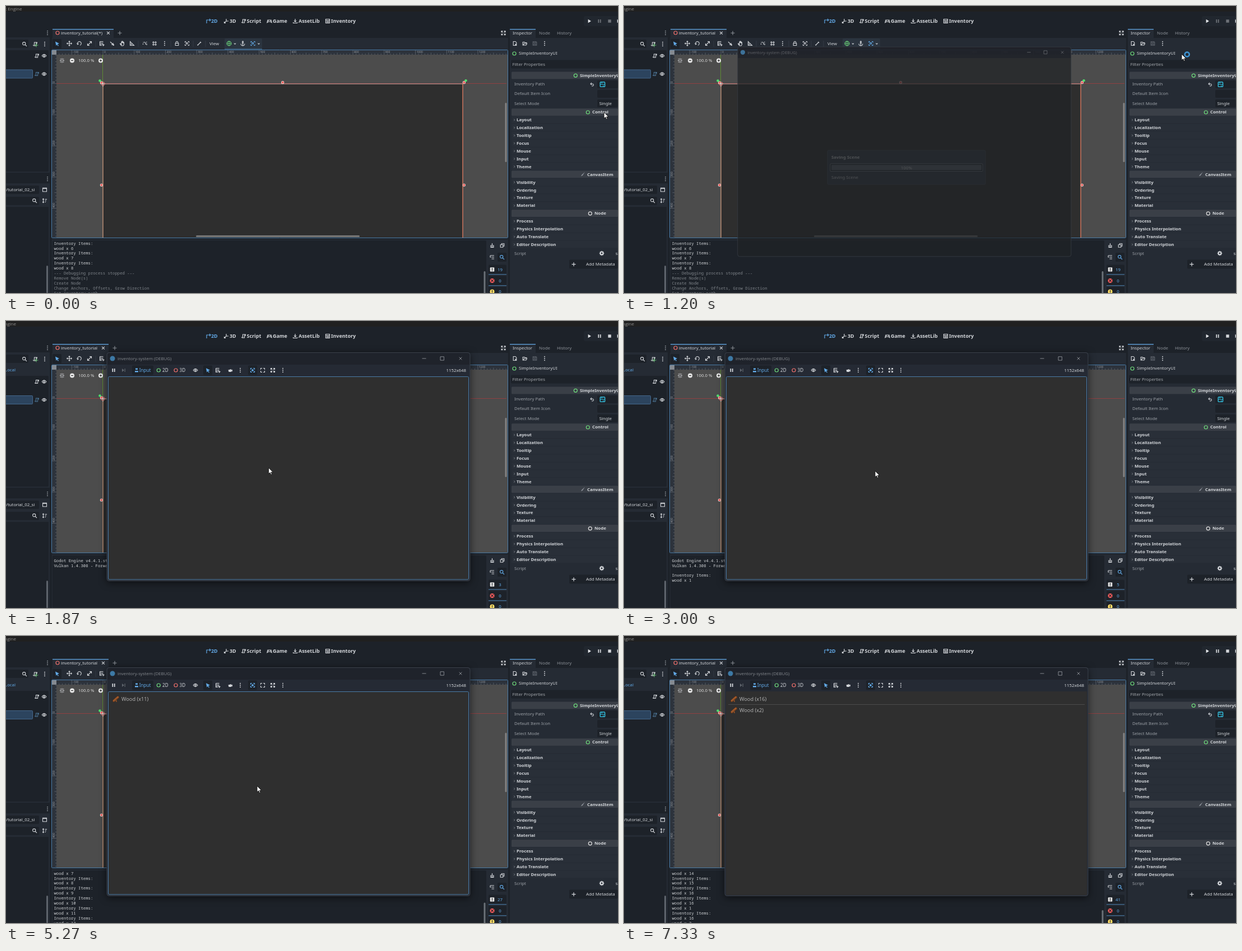
An HTML page with a canvas for the animation above (7800 ms loop, 1092 px wide and 513 px high).

```html
<!DOCTYPE html>
<html lang="en">
<head>
<meta charset="utf-8">
<title>Inventory editor</title>
<style>
html, body { margin: 0; width: 100%; height: 100%; overflow: hidden; background: #1d2229; }
canvas { display: block; width: 1092px; height: 513px; }
</style>
</head>
<body>
<canvas id="stage" width="1092" height="513"></canvas>
<script>
const c = document.getElementById('stage').getContext('2d');
const LOOP = 7800, FPS = 15;
const SANS = '"Noto Sans", sans-serif';
const GAME = '"Open Sans", sans-serif';
const MONO = '"Noto Sans Mono", monospace';
const BG = '#1d2229', PANEL = '#252b34', FG = '#d3d6da', DIM = '#8d9299', BLUE = '#62a9e6', EDGE = '#4a7ca8';
const GREEN = '#6fdc7c', RED = '#f0706c', BAR = '#3a3f47', MUTED = '#5d636b';

// Icon outlines, centred on the origin
const ICON = {
  select: 'M-3-4L4-.5L1 .7L3 3.5L1.8 4.3L0 1.5L-1.6 3.4Z',
  move: 'M0-4V4M-4 0H4M-1.3-3L0-4.3L1.3-3M-1.3 3L0 4.3L1.3 3M-3-1.3L-4.3 0L-3 1.3M3-1.3L4.3 0L3 1.3',
  rotate: 'M-3.2 1.5A3.4 3.4 0 1 1 1 3.2M-4.4-.5L-3.2 1.8L-1.2 .3',
  scale: 'M-3 3L3-3M0-3.5H3.5V0M-3.5 0V3.5H0',
  list: 'M-3.5-3.5H2.5M-3.5-1H2.5M-3.5 1.5H0M-3.5-3.5V3.5H0M1 1L4 2.5L2.5 4Z',
  pivot: 'M-3-3L2 2M2-1V2H-1M3 1V4M1.5 3H4',
  hand: 'M-3 0L-1 2V-3H0V-1V-4H1V-1V-3H2.3V0V-2H3.4V2L2 4H-1L-3.5 .5Z',
  ruler: 'M-3.5-3.5V3.5H3.5ZM-1.8 .2V1.8H0',
  magnet: 'M-3.5-2H-1.5M-3.5 2V0M1-2V2M3 0V3M-.5-3V-1.5M3.5-2.5H2',
  grid: 'M-2-4V4M2-4V4M-4-2H4M-4 2H4',
  lock: 'M-2.8-.5H2.8V3.5H-2.8ZM-1.8-.5V-2A1.8 1.8 0 0 1 1.8-2V-.5',
  group: 'M-3.5-1.5V-3.5H-1.5M1.5-3.5H3.5V-1.5M3.5 1.5V3.5H1.5M-1.5 3.5H-3.5V1.5M-1.5-1.5H1V1H-1.5Z',
  bone: 'M-2.5 2.5L2-2M-3.6 2.2L-2.2 3.6M1.4-3.2L3.2-1.4',
  anchor: 'M0-2.2V4M-3.5 .5Q-3 4 0 4Q3 4 3.5 .5M-1.8-.8H1.8M0-4.1A1 1 0 1 1 0-2.1A1 1 0 1 1 0-4.1',
  chev: 'M-1.6-.8L0 .8L1.6-.8',
  right: 'M-.8-1.6L.8 0L-.8 1.6',
  search: 'M1.4 1.4L4 4M1.8-.8A2.6 2.6 0 1 1-3.4-.8A2.6 2.6 0 1 1 1.8-.8',
  script: 'M-3 3H1.5L2-3H-1.5V2.5M-1.5-3H3.3V-1.2H2M-3.3 1.5V3',
  eye: 'M-4 0Q0-5.2 4 0Q0 5.2-4 0M1.2 0A1.2 1.2 0 1 1-1.2 0A1.2 1.2 0 1 1 1.2 0',
  expand: 'M-3.5-1V-3.5H-1M1-3.5H3.5V-1M3.5 1V3.5H1M-1 3.5H-3.5V1M-3-3L-1-1M3-3L1-1M-3 3L-1 1M3 3L1 1',
  frame: 'M-3.5-1V-3.5H-1M1-3.5H3.5V-1M3.5 1V3.5H1M-1 3.5H-3.5V1',
  cross: 'M-2.4-2.4L2.4 2.4M2.4-2.4L-2.4 2.4',
  plus: 'M-3.5 0H3.5M0-3.5V3.5',
  win: 'M-3.5-3.2H3.5V3.2H-3.5ZM-3.5-2.2H3.5',
  sort: 'M-2.5-3.5V3.5M-3.8-2.2L-2.5-3.6L-1.2-2.2M-3.8 2.2L-2.5 3.6L-1.2 2.2M.5-2.5H4M.5 0H3M.5 2.5H2',
  doc: 'M-2.8-3.5H1L2.8-1.5V3.5H-2.8ZM0 2H3M1.4 .5V3.5',
  folder: 'M-3.8-2.5H-1L0-1.5H3V0H-1.5L-3 3H-3.8ZM-3 3H2L3.8 0',
  save: 'M-3.3-3.3H2.2L3.3-2.2V3.3H-3.3ZM-1.5-3V-1H1.5V-3M-1.5 3V1H1.5V3',
  undo: 'M-2.5-.8H1A2 2 0 0 1 1 3H-1M-1-2.8L-3-.8L-1 1.2',
  broom: 'M0-4V-.5M-2.5 0H2.5V3.5H-2.5ZM-.8 1.5V3.5M.8 1.5V3.5',
  copy: 'M-3.3-1.3H1.3V3.3H-3.3ZM-1.3-1.3V-3.3H3.3V1.3H1.3',
  tree: 'M-3.5-3H3.5M-1-0H3.5M-1 3H3.5M-3.5-3V0H-2',
  d2: 'M-3 4V-2H4M2-4L4-2L2 0',
  d3: 'M-3.5 3.5L0 0V-4M0 0H4M-3.5 1V3.5H-1',
  game: 'M-4 2.5L-3-2H3L4 2.5L1.5 1H-1.5ZM-1-.5H-2.5M1-.5H2.5',
  down: 'M0-4V1M-2-1L0 1.5L2-1M-3.5 2V3.5H3.5V2',
  items: 'M-3.5-3.5H3.5V3.5H-3.5ZM-3.5-1H3.5M-1-1V3.5M1.2-1V3.5',
  brush: 'M-3.5 3.5L-2 1L3.5-4L-.5 2.2Z',
  joy: 'M-3 3.5V1H3V3.5ZM0 1V-1M-2-3.5H2V-1H-2Z',
  cam: 'M-3.5-.5L2-2V3H-2.5ZM2 0L4-1.5V2.5L2 1.5M-2-3H0',
  center: 'M-4 0H-1M1 0H4M0-4V-1M0 1V4M-3-3L-2-2M3 3L2 2M3-3L2-2M-3 3L-2 2',
  play: 'M-2.4-3.2L3 0L-2.4 3.2Z',
  pause: 'M-2.6-3H-.8V3H-2.6ZM.8-3H2.6V3H.8Z',
  stop: 'M-2.7-2.7H2.7V2.7H-2.7Z',
  next: 'M-3-3L1 0L-3 3ZM1.6-3H2.8V3H1.6Z'
};
for (const k in ICON) ICON[k] = new Path2D(ICON[k]);
const ARROW = new Path2D('M0 0V11L2.6 8.6L4.3 12.4L6.1 11.6L4.4 8H8Z');

function rect(x, y, w, h, col, r = 0) {
  c.fillStyle = col;
  c.beginPath(); c.roundRect(x, y, w, h, r); c.fill();
}
function box(x, y, w, h, col, r = 0, lw = 1) {
  c.strokeStyle = col; c.lineWidth = lw;
  c.beginPath(); c.roundRect(x, y, w, h, r); c.stroke();
}
function line(x1, y1, x2, y2, col, lw = 1) {
  c.strokeStyle = col; c.lineWidth = lw;
  c.beginPath(); c.moveTo(x1, y1); c.lineTo(x2, y2); c.stroke();
}
function disc(x, y, r, col) {
  c.fillStyle = col;
  c.beginPath(); c.arc(x, y, r, 0, 7); c.fill();
}
function ring(x, y, r, col, lw = 1.2) {
  c.strokeStyle = col; c.lineWidth = lw;
  c.beginPath(); c.arc(x, y, r, 0, 7); c.stroke();
}
// y is the middle of the capitals
function text(s, x, y, col = FG, size = 7.82, o = {}) {
  c.font = (o.bold ? '700 ' : '') + size + 'px ' + (o.font || SANS);
  c.textAlign = o.align || 'left';
  c.fillStyle = col;
  c.fillText(s, x, y + size * .357);
}
function icon(name, x, y, col = FG, lw = 1.1, fill = false) {
  c.save();
  c.translate(x, y);
  c.fillStyle = c.strokeStyle = col; c.lineWidth = lw;
  fill ? c.fill(ICON[name]) : c.stroke(ICON[name]);
  c.restore();
}
const solid = (name, x, y, col) => icon(name, x, y, col, 1, true);
function dots(x, y, col = FG) {
  for (let i = -1; i < 2; i++) disc(x, y + i * 3.2, .95, col);
}

function topBar(f) {
  rect(0, 0, 1092, 10, '#202020');
  text('Godot Engine', f < 14 ? 28.5 : 18, 5, '#8f8f8f', 8, { align: 'right', font: GAME });
  const tabs = [['d2', 361, '2D', 366], ['d3', 393, '3D', 399], ['script', 424, 'Script', 429.5],
    ['game', 470, 'Game', 476], ['down', 516, 'AssetLib', 522], ['items', 574, 'Inventory', 580]];
  tabs.forEach(([n, ix, s, x], i) => {
    const col = i ? FG : BLUE;
    icon(n, ix, 27, col, 1.2);
    text(s, x, 27, col, 8.93, { bold: true });
  });
  const on = f >= 20 ? FG : '#6d7278';
  rect(1031, 18, 61, 18, '#21272f', 3);
  solid('play', 1041, 27, '#e4e6e9');
  solid('pause', 1059, 27, on);
  solid('stop', 1077, 27, on);
  solid('play', 1093, 27, FG);
}

function leftDock(f) {
  const run = f >= 20;
  rect(0, 56, 78, 242, PANEL);
  dots(74, 48, DIM);
  rect(0, 60, 40, 15, BG, 2);
  icon('search', 33, 68);
  icon('script', 52, 68);
  icon('plus', 54, 70, GREEN, .8);
  dots(69, 68);
  rect(0, run ? 98 : 79, 76, run ? 198 : 217, BG, 2);
  if (run) text('Local', 17, 87.5, BLUE, 7.82, { align: 'right' });
  const y1 = run ? 108.5 : 89, y2 = run ? 141 : 121.5;
  rect(-3, y2 - 7.5, 50.5, 15, '#2c445e', 1);
  box(-3, y2 - 7.5, 50.5, 15, '#44678b', 1);
  icon('script', 55, y1);
  icon('eye', 68, y1);
  icon('script', 55, y2, '#4d7596');
  icon('eye', 68, y2);

  rect(0, 317, 78, 196, PANEL);
  dots(74, 309, DIM);
  rect(0, 321, 59, 15, BG, 2);
  text('/tutorial_02_si', 0, 328, FG);
  icon('win', 69, 328.5);
  rect(0, 341, 59, 15, BG, 2);
  icon('search', 51, 348);
  icon('sort', 69, 348);
  rect(0, 359, 76, 154, BG);
  rect(72, 464, 3, 49, '#5e646c', 1.5);
}

function toolbar(f) {
  const dirty = f < 14, end = dirty ? 192 : 183;
  rect(83, 41, end - 83, 16, PANEL);
  rect(83, 41, end - 83, 1.2, BLUE);
  ring(92, 48, 3, RED);
  text('inventory_tutorial' + (dirty ? '(*)' : ''), 98, 48.3, FG);
  icon('cross', end - 9.5, 48.3);
  icon('plus', end + 11, 48.3, DIM);
  icon('expand', 887.5, 48.3);
  rect(82, 57, 814, 21, PANEL);
  rect(83, 59, 16, 17, BG, 2);
  solid('select', 91, 67.5, BLUE);
  'move113 rotate131 scale149 list171 pivot189 hand207 ruler225 magnet248 grid265 lock305 group323 bone345'
    .split(' ').forEach(s => icon(s.match(/\D+/)[0], +s.match(/\d+/)[0], 67));
  dots(283, 67);
  for (const x of [160, 236, 294, 334, 356]) line(x, 62, x, 73, '#343b45');
  text('View', 363, 67.3);
  rect(390, 58, 67, 19, '#2b343f', 2);
  rect(390, 76.5, 67, 1, EDGE);
  ring(398, 67, 3.8, GREEN);
  icon('plus', 398, 67, GREEN, .9);
  icon('chev', 408.5, 67.5);
  icon('anchor', 422.5, 67);
  icon('group', 440.5, 67, BLUE);
  icon('chev', 451, 67.5);
}

function ruler() {
  const S = 55.75, dark = '#2d333c', tick = '#747a82';
  rect(82, 79, 813, 8, dark);
  rect(82, 79, 8, 335, dark);
  c.save();
  c.beginPath(); c.rect(90, 79, 805, 8); c.clip();
  for (let k = -20; k < 130; k++) {
    const x = 173 + k * S / 10;
    line(x, k % 10 ? (k % 5 ? 85 : 83.5) : 79, x, 87, tick, .6);
    if (k % 10 === 0) text(k * 10, x + 2, 82.5, '#9a9fa6', 5);
  }
  c.restore();
  c.save();
  c.beginPath(); c.rect(82, 87, 8, 327); c.clip();
  for (let k = -10; k < 50; k++) {
    const y = 138.5 + k * S / 10;
    line(k % 10 ? (k % 5 ? 88 : 86.5) : 82, y, 90, y, tick, .6);
    if (k % 10 === 0) {
      c.save();
      c.translate(85.5, y - 1); c.rotate(-Math.PI / 2);
      text(k * 10, 0, 0, '#9a9fa6', 5);
      c.restore();
    }
  }
  c.restore();
  rect(82, 79, 8, 8, '#858a91');
}

function handle(x, y) {
  disc(x, y, 2.6, '#fff');
  disc(x, y, 2.1, '#e8605c');
}

function viewport() {
  rect(82, 79, 813, 335, '#4c4c4c');
  rect(173, 139, 642, 275, '#2e2e2e');
  line(90, 138.5, 893, 138.5, '#8f3f42');
  line(172.5, 87, 172.5, 139, '#5d8b33');
  line(173, 139.2, 815, 139.2, '#c3a59b', 1.1);
  line(173, 139, 173, 414, '#e2a887', 1.1);
  line(815, 139, 815, 414, '#e27c62', 1.3);
  disc(167.5, 133.5, 2.3, '#4fe06c');
  disc(820.5, 133.3, 2.3, '#4fe06c');
  handle(170.5, 137);
  line(168.5, 139, 177, 139, '#ddd', 1);
  line(173, 135.5, 173, 144, '#ddd', 1);
  box(170.5, 136.5, 5, 5, RED, 0, .8);
  handle(493.7, 136.7);
  handle(817.3, 136.7);
  handle(170.4, 320);
  handle(817.3, 320);
  icon('center', 100, 97.5);
  disc(118, 97.5, 4, '#e8e8e8');
  line(116, 97.5, 120, 97.5, '#333', 1.2);
  text('100.0 %', 129, 97.7, '#d8d8d8');
  disc(169, 97.5, 4, '#e8e8e8');
  line(167, 97.5, 171, 97.5, '#333', 1.2);
  line(169, 95.5, 169, 99.5, '#333', 1.2);
  rect(890.5, 173, 3, 106, '#838383', 1.5);
  rect(339, 410, 292, 3, '#7b7b7b', 1.5);
  ruler();
  box(81.5, 78.5, 814, 336, EDGE, 1);
}

const OUT = [45, 51, 55, 58, 61, 65, 68, 70, 72, 74, 77, 79, 82, 84, 87, 89];
const LATE = { 45: 46, 74: 75, 79: 80 };
function stock(f) {
  return {
    logged: OUT.filter(t => f >= t).length,
    shown: OUT.filter(t => f >= (LATE[t] || t)).length,
    spill: (f >= 91) + (f >= 94)
  };
}

function output(f, st) {
  const HEAD = 'Inventory Items:', log = [];
  let badge = 0, gray = Infinity, bar = 0;
  if (f < 19) {
    for (let i = 6; i < 9; i++) log.push(HEAD, 'wood x ' + i);
    log.push('--- Debugging process stopped ---', 'Remove Node(s)', 'Create Node',
      'Change Anchors, Offsets, Grow Direction', 'Set inventory path');
    badge = 19; gray = 6; bar = 474;
  } else if (f >= 27) {
    log.push('Godot Engine v4.4.1.stable', 'Vulkan 1.4.308 - Forward+', '');
    for (let i = 1; i <= st.logged; i++) log.push(HEAD, 'wood x ' + i);
    for (let i = 1; i <= st.spill; i++) log.push(HEAD, 'wood x 16', 'wood x ' + i);
    badge = 3 + st.logged * 2 + st.spill * 3;
    if (log.length > 10) bar = 516 - 97 * 11 / log.length;
  }
  rect(82, 417, 814, 96, PANEL);
  rect(83, 419, 774, 94, BG, 2);
  const tail = log.slice(-11), top = tail.length > 10 ? 424 : 428;
  tail.forEach((s, i) =>
    text(s, 85.5, top + i * 8.95, i >= gray ? '#7f848a' : '#cfd2d5', 7.28, { font: MONO }));
  if (bar) rect(852.5, bar, 3, 60, '#6b7178', 1.5);

  icon('broom', 867.5, 428);
  icon('copy', 885.5, 428);
  icon('tree', 867.5, 449);
  rect(877, 441, 16, 16, BG, 2);
  icon('search', 885, 449, BLUE);
  [471, 491, 510.5].forEach((y, i) => {
    rect(861, y - 8.5, 32, 17.5, BG, 2);
    rect(861, y + 8.2, 32, 1.1, EDGE);
    if (i) disc(867.5, y, 4, i > 1 ? '#ffdd65' : '#ff5f5f');
    else rect(863.7, y - 3.8, 7.6, 7.6, '#e0e0e0', 1);
    if (i === 1) icon('cross', 867.5, y, BG, 1.1);
    else { line(867.5, y - 2.5, 867.5, y + .8, BG, 1.3); disc(867.5, y + 2.3, .75, BG); }
    text(i ? 0 : badge, 881.5, y + .2, BLUE, 7.82, { align: 'center' });
  });
}

function category(y, s, x, mark) {
  rect(902, y - 6.5, 190, 13, BAR, 1.5);
  if (mark) ring(x - 7.7, y + .3, 3, mark);
  else icon('brush', x - 7.7, y, DIM, 1, true);
  text(s, x, y, FG, 7.82, { bold: true });
}
function sections(y, names) {
  names.forEach((s, i) => {
    const row = y + i * 13.92;
    rect(902, row - 6.3, 190, 12.7, 'rgba(255,255,255,.018)');
    icon('right', 907, row + .3, DIM, .9);
    text(s, 911, row, FG, 7.82, { bold: true });
  });
}

function inspector() {
  rect(899, 57, 193, 456, PANEL);
  rect(899, 41, 46, 16, PANEL);
  rect(899, 41, 46, 1.2, BLUE);
  text('Inspector', 904, 48.3, FG);
  text('Node', 951, 48.3, DIM);
  text('History', 983, 48.3, DIM);
  icon('doc', 908, 67);
  icon('folder', 926, 67);
  icon('save', 943.5, 67, MUTED);
  dots(961, 67);
  ring(907, 85, 3, GREEN);
  text('SimpleInventoryUI', 915, 84.7, FG);
  rect(901, 96.5, 191, 15, BG, 2);
  text('Filter Properties', 903.5, 104, '#a4a8ad');
  const label = '#9da2a8';
  category(124, 'SimpleInventoryUI', 1024, GREEN);
  text('Inventory Path', 907, 139.5, label);
  icon('undo', 1046, 140);
  rect(1055, 133, 37, 14, BG, 2);
  box(1060.2, 136, 8.4, 8.4, '#35c5e6', 1, 1.3);
  line(1060, 140, 1069, 140, '#35c5e6');
  line(1063, 136, 1063, 138.5, '#35c5e6');
  line(1066, 141.5, 1066, 144, '#35c5e6');
  text('Default Item Icon', 907, 156.5, label);
  rect(1055, 150, 37, 14, BG, 2);
  text('Select Mode', 907, 174, label);
  rect(1055, 167, 37, 14, BG, 2);
  text('Single', 1058.5, 174.3);
  category(189.7, 'Control', 1046, GREEN);
  sections(203.3, ['Layout', 'Localization', 'Tooltip', 'Focus', 'Mouse', 'Input', 'Theme']);
  category(300.8, 'CanvasItem', 1037, null);
  sections(314.8, ['Visibility', 'Ordering', 'Texture', 'Material']);
  category(370.5, 'Node', 1050, '#e0e0e0');
  sections(384.3, ['Process', 'Physics Interpolation', 'Auto Translate', 'Editor Description']);
  text('Script', 907, 442, label);
  ring(1063, 442, 2.4, FG, 2);
  for (let i = 0; i < 8; i++) {
    const a = i * Math.PI / 4;
    line(1063 + 3 * Math.cos(a), 442 + 3 * Math.sin(a), 1063 + 4.3 * Math.cos(a), 442 + 4.3 * Math.sin(a), FG, 1.3);
  }
  text('simple', 1087.5, 442.5, FG);
  rect(1005, 453.5, 87, 16, BG, 2);
  icon('plus', 1013, 461.7, FG, 1.2);
  text('Add Metadata', 1035, 461.7);
}

function saveDialog() {
  rect(363, 258, 282, 61, '#333a45', 2);
  box(363, 258, 282, 61, '#444c58', 2);
  text('Saving Scene', 370, 270.7, FG, 7.82, { bold: true });
  rect(368, 282, 272, 13.5, BG, 1);
  box(368, 282, 272, 13.5, '#7a8089', 1);
  rect(370, 284, 268, 9.5, '#5a616b', 1);
  text('100%', 504, 289, FG, 7.82, { align: 'center' });
  text('Saving Scene', 370, 306, FG);
}

function wood(y, n) {
  c.save();
  c.translate(196, y); c.rotate(-.72); c.lineCap = 'round';
  line(-4.8, 0, 5, 0, '#5a321b', 4.6);
  line(-4.6, -.2, 4.8, -.2, '#a05a2c', 3.2);
  line(-3, .9, 3, .9, '#7c4320', 1);
  line(-1, 1, -2, 4, '#8f4f27', 1.8);
  c.restore();
  text('Wood (x' + n + ')', 206, y, '#b8b8b8', 9.2, { font: GAME });
}

function gameWindow(f, st) {
  const live = f >= 25, tint = live ? '#85898f' : f < 19 ? '#777a7e' : '#dcdee0';
  c.save();
  if (f >= 20) { c.shadowColor = 'rgba(0,0,0,.6)'; c.shadowBlur = 14; c.shadowOffsetY = 3; }
  rect(180, 56, 648, 408.5, f < 20 ? '#202225' : '#252a34', 4);
  c.restore();
  rect(180.5, 56.5, 647, 21.5, '#1f232b', [4, 4, 0, 0]);
  box(180, 56.5, 648, 408, '#3b414b', 4);
  disc(190, 67, 4.5, live ? '#3d79a5' : '#478cbf');
  text('inventory-system (DEBUG)', 199, 67.3, tint, 7.85, { font: GAME });
  line(742.5, 67, 749.5, 67, tint, 1);
  box(775, 63.8, 6.4, 6.4, tint, 0, 1);
  icon('cross', 811, 67, tint, 1, false);
  if (f < 20) return;

  solid('pause', 192, 88, FG);
  solid('next', 210, 88, MUTED);
  rect(225, 79.5, 38, 17, BG, 2);
  solid('joy', 233, 88, BLUE);
  text('Input', 237.8, 88.2, BLUE, 8.1);
  ring(272.3, 88, 3, GREEN);
  text('2D', 279, 88.2, FG, 8.1);
  ring(303, 88, 3, RED);
  text('3D', 309.5, 88.2, FG, 8.1);
  icon('eye', 338, 88);
  rect(352, 79.5, 16, 17, BG, 2);
  solid('select', 360, 88.3, BLUE);
  icon('list', 378, 88);
  solid('cam', 400, 88, FG);
  dots(418, 88);
  rect(432, 79.5, 16, 17, BG, 2);
  icon('frame', 440, 88, BLUE, 1.2);
  rect(438.3, 86.3, 3.4, 3.4, BLUE);
  icon('frame', 458, 88);
  icon('expand', 476, 88);
  dots(494, 88);

  if (!live) {
    text('Game starting...', 503.5, 280.3, '#c3c6ca', 7.82, { align: 'center' });
    return;
  }
  text('1152x648', 821, 88.2, FG, 7.82, { align: 'right' });
  rect(182, 99, 644, 364, '#2f2f2f', 1);
  if (st.shown) wood(112.7, st.shown);
  if (st.spill) {
    line(186, 122.5, 822, 122.5, '#4b4b4b');
    wood(132.8, st.spill);
  }
  if (f < 110) box(182.5, 99.5, 643, 362.5, EDGE, 2);
}

// Frame, x and y of the pointer's tip
const PATH = [[0, 1067, 190], [6, 995, 86], [18, 995, 86], [19, 930, 112], [21, 708, 194], [25, 530, 245],
  [29, 448, 268], [97, 448, 268], [101, 239, 390], [105, 75, 482], [109, -14, 520]];
function cursor(f) {
  if (f >= 109) return;
  const i = PATH.findIndex(p => p[0] > f);
  const a = PATH[i - 1], b = PATH[i], k = (f - a[0]) / (b[0] - a[0]);
  const x = a[1] + (b[1] - a[1]) * k, y = a[2] + (b[2] - a[2]) * k;
  if (f >= 15 && f < 25) {
    ring(x + 9.7, y + .5, 4, '#2f7fbd', 2.8);
    ring(x + 9.7, y + .5, 4, '#4b9fda', 1.2);
  }
  c.save();
  c.translate(x, y);
  c.fillStyle = '#fff'; c.strokeStyle = '#111'; c.lineWidth = .9;
  c.fill(ARROW); c.stroke(ARROW);
  c.restore();
}

function draw(f) {
  const st = stock(f);
  rect(0, 0, 1092, 513, BG);
  topBar(f);
  leftDock(f);
  toolbar(f);
  viewport();
  output(f, st);
  inspector();
  if (f >= 15 && f < 20) saveDialog();
  if (f >= 17) {
    const p = Math.min(1, (f - 17) / 4), s = 1 - .1 * (1 - p) ** 0.7;
    c.save();
    c.globalAlpha = [.35, .74, .94][f - 17] || 1;
    c.translate(504 - 5 * (1 - p), 260);
    c.scale(s, s);
    c.translate(-504, -260);
    gameWindow(f, st);
    c.restore();
  }
  cursor(f);
}

const start = performance.now();
let last = -1;
function tick() {
  const t = (performance.now() - start) % LOOP;
  const f = Math.floor(t * FPS / 1000 + .1) % 117;
  if (f !== last) draw(last = f);
  requestAnimationFrame(tick);
}
tick();
</script>
</body>
</html>
```
